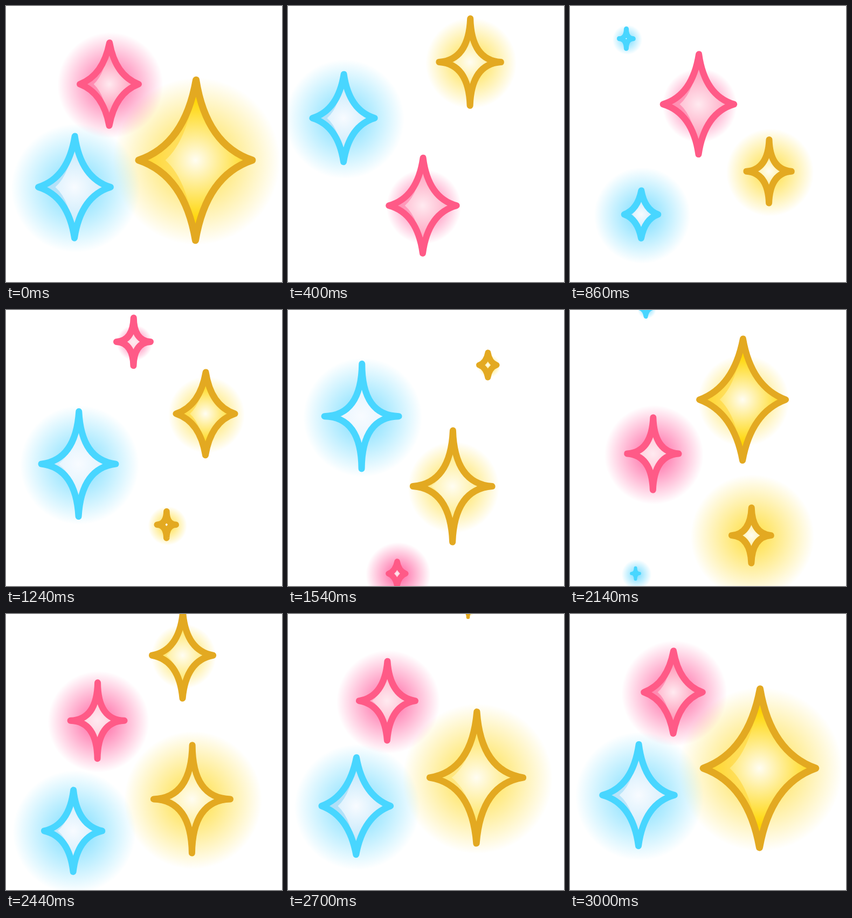
Recreate the animation shown at these times as an HTML page with a canvas. Size 512x512 px, loop 3.02 s.

```html
<!DOCTYPE html>
<html lang="en">
<head>
<meta charset="utf-8">
<title>Rising sparkles</title>
<style>
  html, body { margin: 0; width: 100%; height: 100%; overflow: hidden; background: #fff; }
  canvas { display: block; width: 512px; height: 512px; }
</style>
</head>
<body>
<canvas id="stage" width="512" height="512"></canvas>
<script>
const LOOP = 3020, STEP = 20;
const ASPECT = 1.41;              // star height to width
const GROW = 500, SHRINK = 600;   // how long a star takes to appear and vanish
const WOBBLE = 1500;              // period of the change between slim and wide
const ctx = document.getElementById('stage').getContext('2d');

const looks = {
  yellow: { line: '#e3a921', core: '#fffdf2', edge: '#ffd500', facet: 'rgba(255,212,50,', glow: '255,220,48' },
  blue: { line: '#48d6ff', core: '#f8fbff', edge: '#c2e8fb', facet: 'rgba(140,212,245,', glow: '110,218,255' },
  pink: { line: '#ff5a87', core: '#ffeaf0', edge: '#ff8fb2', facet: 'rgba(255,105,155,', glow: '255,84,152' }
};

// The pose in which the loop begins and ends.
const rest = {
  yellow: { x: 351.5, y: 286, size: 105.5 },
  blue: { x: 127, y: 336, size: 67 },
  pink: { x: 191.5, y: 145, size: 54.5 }
};

// Three kinds of life: leave the rest pose, float past, settle into the rest pose.
// wide: time when the sides are fullest; spread: glow radius per size; bend: bow of the path
const leave = (look, end, to, more) => ({ look, born: 0, end, from: rest[look], to, ...more });
const float = (look, born, end, from, to, more) => ({ look, born, end, from, to, grows: true, ...more });
const settle = (look, born, from, more) =>
  ({ look, born, end: LOOP, from, to: rest[look], grows: true, stays: true, ...more });

const stars = [
  leave('yellow', 620, { x: 330, y: 4, size: 105 }, { wide: -150, spread: 1.47 }),
  leave('blue', 965, { x: 109, y: 27, size: 45 }, { wide: 200, spread: 1.78, bend: [-17, 0] }),
  leave('pink', 360, { x: 195, y: 10, size: 54 }, { wide: 0, spread: 1.8 }),
  float('pink', 0, 1430, { x: 268, y: 568, size: 66 }, { x: 238, y: 8, size: 66 },
    { wide: 650, spread: 1.05, bend: [-12, -51] }),
  float('yellow', 630, 1640, { x: 368.5, y: 376, size: 63 }, { x: 371, y: 72, size: 63 },
    { wide: 1400, spread: 1.3 }),
  float('blue', 710, 2200, { x: 131, y: 423, size: 69 }, { x: 141, y: -25, size: 69 },
    { wide: 780, spread: 1.6, bend: [0, 24] }),
  float('yellow', 1170, 2740, { x: 296, y: 414, size: 80 }, { x: 335, y: -19, size: 80 },
    { wide: 2070, spread: 1.06, bend: [0, 21] }),
  settle('pink', 1420, { x: 240, y: 547, size: 42 }, { wide: 3100, spread: 1.8, bend: [-62, 0] }),
  settle('yellow', 1900, { x: 327, y: 500, size: 39 }, { wide: 3100, spread: 1.45 }),
  settle('blue', 2100, { x: 121, y: 503, size: 58 }, { wide: 2750, spread: 1.78 })
];

const mix = (a, b, u) => a + (b - a) * u;
const ramp = u => Math.sin(Math.PI / 2 * Math.max(0, Math.min(1, u)));

function poseAt(star, t) {
  const { born, end, from, to, bend = [0, 0] } = star;
  const life = end - born, u = (t - born) / life;
  const way = star.stays ? 1 - (1 - u) ** 2 : u;
  const bow = 4 * way * (1 - way);
  const size = mix(from.size, to.size, u);
  const grown = time => star.grows ? ramp((t - born) / time) : 1;
  const left = star.stays ? 1 : ramp((end - t) / Math.min(SHRINK, life));
  const fullest = Math.max(from.size, to.size);
  const w = size * grown(GROW) * left;
  return {
    name: star.look,
    look: looks[star.look],
    x: mix(from.x, to.x, way) + bend[0] * bow,
    y: mix(from.y, to.y, way) + bend[1] * bow,
    w,
    h: w * ASPECT,
    curve: 0.11 + 0.1 * Math.cos(2 * Math.PI * (t - star.wide) / WOBBLE),
    // the glow opens sooner than the star and follows its size at half strength
    glow: star.spread * (size + fullest) / 2 * grown(GROW / 2) * left
  };
}

function drawGlow({ x, y, glow, look, name }) {
  if (glow < 1) return;
  const fill = ctx.createRadialGradient(x + 2, y + 2, 0, x + 2, y + 2, glow);
  fill.addColorStop(0, `rgba(${look.glow},0.95)`);
  fill.addColorStop(1, `rgba(${look.glow},0)`);
  ctx.globalCompositeOperation = name === 'pink' ? 'multiply' : 'source-over';
  ctx.fillStyle = fill;
  ctx.fillRect(x + 2 - glow, y + 2 - glow, 2 * glow, 2 * glow);
  ctx.globalCompositeOperation = 'source-over';
}

function drawStar({ x, y, w, h, curve, look }) {
  if (w < 1) return;
  const cx = curve * w, cy = curve * h, lean = w / 100;
  ctx.save();
  ctx.translate(x, y);

  const body = new Path2D();
  body.moveTo(lean, -h);
  body.quadraticCurveTo(cx, -cy, w, 0);
  body.quadraticCurveTo(cx, cy, 0, h);
  body.quadraticCurveTo(-cx, cy, -w, 0);
  body.quadraticCurveTo(-cx, -cy, lean, -h);
  body.closePath();

  // slim stars look paler
  const fill = ctx.createRadialGradient(0, 0, 0, 0, 0, h * (0.72 + Math.max(0, 0.2 - curve) * 4));
  fill.addColorStop(0, look.core);
  fill.addColorStop(1, look.edge);
  ctx.fillStyle = fill;
  ctx.fill(body);

  // darker facet along the left side
  const facet = new Path2D();
  facet.moveTo(lean, -h);
  facet.quadraticCurveTo(-cx, -cy, -w, 0);
  facet.quadraticCurveTo(-cx, cy, 0, h);
  facet.quadraticCurveTo(-cx * 0.6, h * 0.26, -w * 0.53, 0);
  facet.quadraticCurveTo(-cx * 0.6, -h * 0.26, lean, -h);
  ctx.fillStyle = look.facet + 0.55 * Math.min(1, 0.15 + curve * 4.5) + ')';
  ctx.fill(facet);

  ctx.strokeStyle = look.line;
  ctx.lineWidth = Math.min(12, 2 + w * 0.55) + Math.max(0, w - 80) / 25;
  ctx.lineJoin = 'round';
  ctx.stroke(body);
  ctx.restore();
}

const start = performance.now();
function frame(now) {
  const t = Math.floor(Math.max(0, now - start) % LOOP / STEP) * STEP;
  ctx.fillStyle = '#fff';
  ctx.fillRect(0, 0, 512, 512);
  const poses = stars.filter(s => t >= s.born && t < s.end).map(s => poseAt(s, t));
  // yellow glows lie beneath, pink tints whatever it covers
  for (const name in looks) poses.filter(p => p.name === name).forEach(drawGlow);
  poses.forEach(drawStar);
  requestAnimationFrame(frame);
}
frame(start);
</script>
</body>
</html>
```
